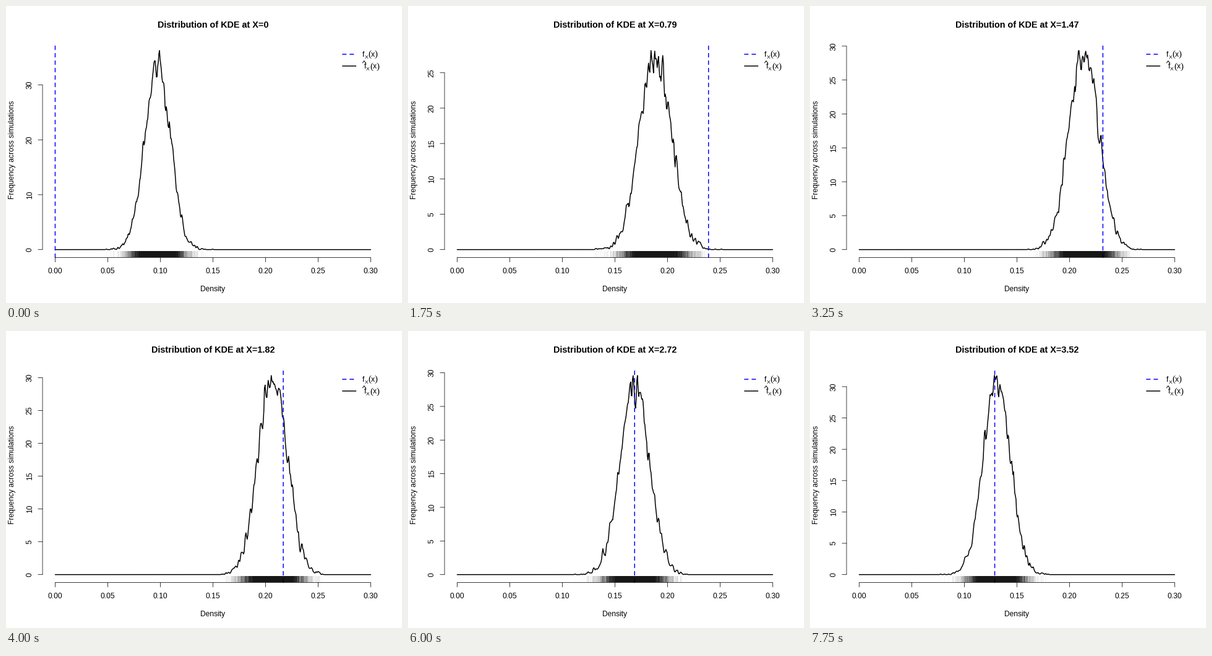
These frames come from a looping animation (640x480 px, 8000 ms). A matplotlib script:

```python
import matplotlib.pyplot as plt
import numpy as np
from matplotlib.animation import FuncAnimation

W, H, DPI = 640, 480, 80
PT = 72 / DPI                      # points per pixel
FRAMES, INTERVAL = 32, 250
X_STEP = 0.113449                  # evaluation point advances by this much

# Plot region in pixels
LEFT, TOP, BOTTOM = 59.04, 59.04, 406.56
X0, X_SPAN, X_MAX = 79.44, 509.93, 0.3
Y0, Y_SPAN = 393.69, 321.78
MID_X, MID_Y = 334.4, 232.8
RUG_TOP, RUG_BOTTOM = 396, 406

SAMPLES, BANDWIDTH = 10000, 0.0005
GRID = np.linspace(0, X_MAX, 512)
STEP = GRID[1]

# Sampling distribution of the estimate along x
KNOTS = X_STEP * np.array([0, 4, 10, 16, 20, 24, 31])
MEANS = [0.0971, 0.1546, 0.2086, 0.2069, 0.1894, 0.1686, 0.1308]
SPREADS = [0.0122, 0.0157, 0.0147, 0.0138, 0.0138, 0.0140, 0.0130]
PEAKS = [36.27, 27.92, 28.36, 30.35, 30.02, 29.60, 31.78]
MEAN_FIT = np.polyfit(KNOTS, MEANS, 5)

plt.rcParams["font.family"] = "Liberation Sans"
fig = plt.figure(figsize=(W / DPI, H / DPI), dpi=DPI, facecolor="white")
ax = fig.add_axes([0, 0, 1, 1])
ax.axis("off")


def to_x(value):
    return X0 + value / X_MAX * X_SPAN


def line(xs, ys, width=0.75, color="black", **kw):
    return ax.plot(xs, ys, color=color, lw=width * PT, snap=False,
                   solid_capstyle="round", solid_joinstyle="round",
                   dash_capstyle="round", **kw)[0]


def label(x, y, text, size=12, ha="center", **kw):
    return ax.text(x, y, text, fontsize=size * PT, ha=ha, va="baseline",
                   rotation_mode="anchor", **kw)


def true_density(x):
    """Chi-squared density with three degrees of freedom."""
    return np.sqrt(x / (2 * np.pi)) * np.exp(-x / 2)


def draw_samples(frame, x):
    rng = np.random.default_rng(100 + frame)
    return rng.normal(np.polyval(MEAN_FIT, x),
                      np.interp(x, KNOTS, SPREADS), SAMPLES)


def estimate(values):
    edges = np.append(GRID - STEP / 2, X_MAX + STEP / 2)
    counts, _ = np.histogram(values, edges)
    kernel = np.exp(-0.5 * (np.arange(-4, 5) * STEP / BANDWIDTH) ** 2)
    return np.convolve(counts, kernel / kernel.sum(), "same")


def rug_image(values):
    counts, _ = np.histogram(to_x(values), np.arange(79, 591))
    image = np.zeros((1, counts.size, 4))
    image[0, :, 3] = np.minimum(1 - 0.965 ** counts, 0.91)
    return image


def draw_legend_entry(x, y):
    label(x, y, "f", ha="left")
    label(x + 3.6, y + 3, "X", 8.4, "left")
    label(x + 9.6, y, "(", 15, "left", family="Liberation Serif")
    label(x + 14, y, "x", ha="left")
    label(x + 20, y, ")", 15, "left", family="Liberation Serif")


# Fixed parts
line([X0, X0 + X_SPAN], [BOTTOM, BOTTOM], zorder=5)
for tick in np.arange(7) * 0.05:
    line([to_x(tick)] * 2, [BOTTOM, BOTTOM + 7.2], zorder=5)
    label(to_x(tick), 432.3, f"{tick:.2f}")
label(MID_X, 461.2, "Density")
label(12.9, MID_Y, "Frequency across simulations", rotation=90)

line([543.8, 565.6], [78, 78], 1.5, "blue", ls=(0, (4, 4)))
line([543.8, 565.6], [97, 97], 1.5)
draw_legend_entry(576, 82)
draw_legend_entry(578.4, 101.4)
line([576.4, 578.8, 581.2], [92, 88.6, 92], 1)

# Moving parts
title = label(MID_X, 34.7, "", 14.4, weight="bold")
curve = line(to_x(GRID), np.full(GRID.size, Y0), 1.5, zorder=2)
marker = line([X0, X0], [BOTTOM, TOP], 1.5, "blue", ls=(0, (4, 4)), zorder=3)
rug = ax.imshow(np.zeros((1, 511, 4)), extent=(79, 590, RUG_BOTTOM, RUG_TOP),
                aspect="auto", interpolation="nearest", zorder=4)
y_axis = line([LEFT, LEFT], [Y0, Y0])
y_ticks = [(line([LEFT - 7.2, LEFT], [Y0, Y0]),
            label(41.7, Y0, "", rotation=90)) for _ in range(9)]
ax.set_xlim(0, W)
ax.set_ylim(H, 0)


def draw_y_axis(peak):
    step = 10 if peak > 36 else 5
    last = int(1.04 * peak // step)
    for i, (tick, text) in enumerate(y_ticks):
        y = Y0 - i * step / peak * Y_SPAN
        tick.set_ydata([y, y])
        tick.set_visible(i <= last)
        text.set_y(y)
        text.set_text(str(i * step) if i <= last else "")
    y_axis.set_ydata([Y0, Y0 - last * step / peak * Y_SPAN])


def update(frame):
    x = frame * X_STEP
    values = draw_samples(frame, x)
    heights = estimate(values)
    title.set_text(f"Distribution of KDE at X={round(x, 2):g}")
    curve.set_ydata(Y0 - heights / heights.max() * Y_SPAN)
    marker.set_xdata([to_x(true_density(x))] * 2)
    rug.set_data(rug_image(values))
    draw_y_axis(np.interp(x, KNOTS, PEAKS))
    return []


anim = FuncAnimation(fig, update, frames=FRAMES, interval=INTERVAL,
                     init_func=lambda: [], repeat=True, repeat_delay=0)
plt.show()
```
